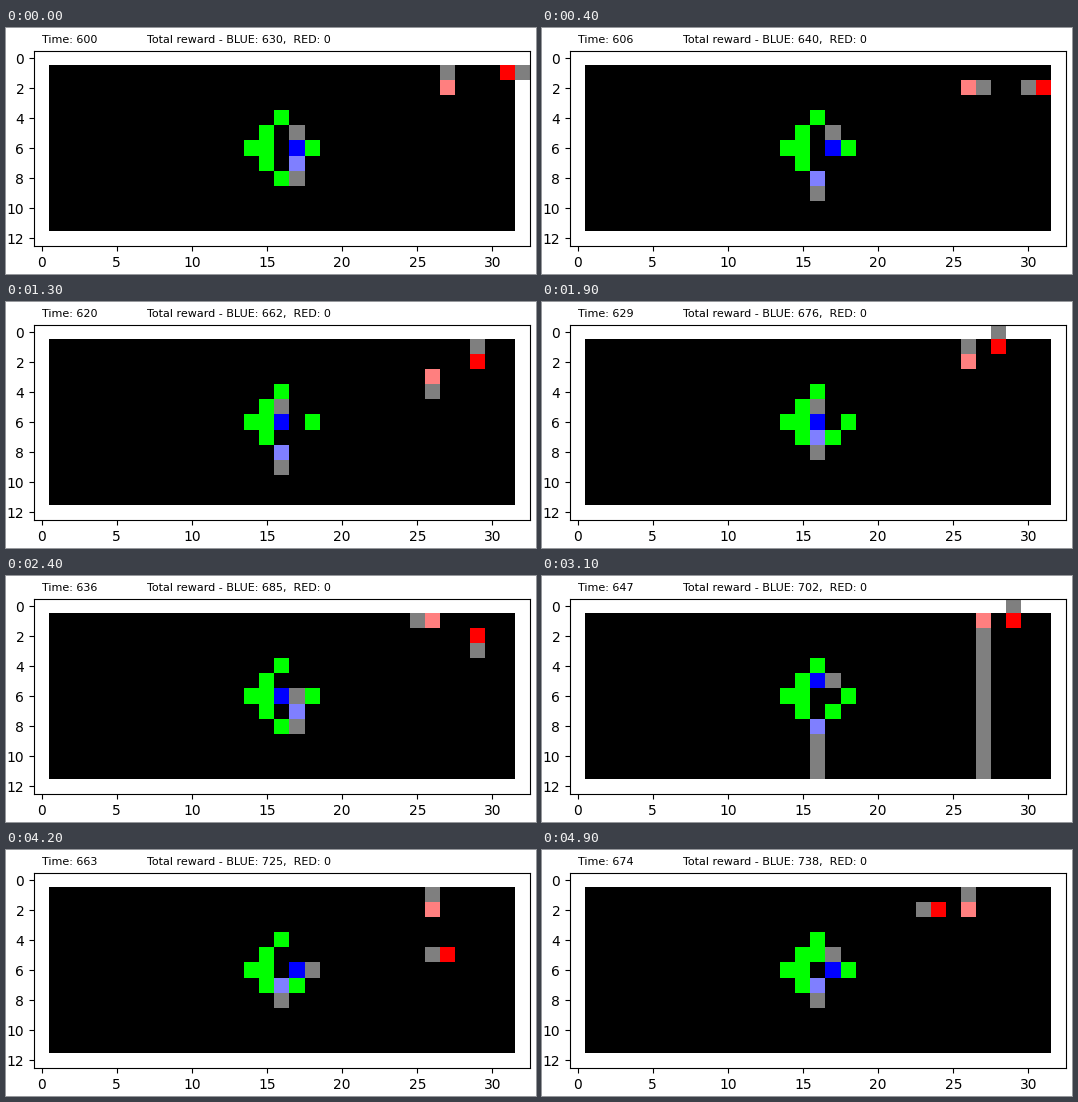
A matplotlib script for the animation above (5000 ms loop, 530 by 246 pixels).

```python
import matplotlib.pyplot as plt
import numpy as np
from matplotlib.animation import FuncAnimation

plt.rcParams["font.family"] = "DejaVu Sans"

W, H, DPI = 530, 246, 100
COLS, ROWS = 33, 13
FRAMES, STEPS, START = 50, 74, 600
AXES_LEFT, AXES_TOP, AXES_WIDTH = 28, 22.6, 496
AXES_HEIGHT = AXES_WIDTH * ROWS / COLS

GRAY, GREEN = (0.5, 0.5, 0.5), (0, 1, 0)
HEADINGS = {"U": (0, -1), "R": (1, 0), "D": (0, 1), "L": (-1, 0)}

# Each waypoint: step, column, row, heading.
RED_PATH = [
    (0, 31, 1, "R"), (3, 31, 2, "D"), (6, 31, 2, "L"), (9, 31, 1, "L"),
    (12, 29, 1, "L"), (15, 29, 2, "U"), (21, 29, 2, "R"), (25, 29, 1, "U"),
    (29, 28, 1, "U"), (32, 28, 2, "D"), (36, 29, 2, "D"), (40, 30, 2, "R"),
    (44, 30, 1, "U"), (47, 29, 1, "U"), (50, 28, 2, "D"), (54, 28, 4, "D"),
    (57, 29, 4, "R"), (60, 28, 5, "L"), (63, 27, 5, "L"), (67, 26, 3, "L"),
    (70, 25, 3, "L"), (74, 24, 2, "L"),
]
PINK_PATH = [
    (0, 27, 2, "U"), (4, 27, 2, "R"), (7, 26, 2, "D"), (12, 25, 2, "D"),
    (16, 25, 3, "R"), (20, 26, 3, "D"), (25, 26, 2, "U"), (29, 26, 2, "U"),
    (32, 26, 1, "L"), (36, 26, 1, "L"), (40, 27, 1, "D"), (47, 27, 1, "D"),
    (50, 27, 2, "D"), (55, 27, 1, "D"), (58, 26, 1, "U"), (63, 26, 2, "U"),
    (70, 26, 2, "L"), (74, 26, 2, "U"),
]
BLUE_PATH = [
    (0, 17, 6, "U"), (3, 16, 6, "U"), (5, 17, 6, "U"), (8, 17, 5, "U"),
    (10, 16, 6, "U"), (12, 17, 6, "U"), (15, 17, 5, "U"), (18, 16, 5, "U"),
    (21, 16, 6, "U"), (24, 17, 6, "U"), (27, 17, 5, "U"), (29, 16, 6, "U"),
    (33, 17, 6, "R"), (36, 16, 6, "R"), (39, 17, 6, "R"), (42, 17, 5, "R"),
    (45, 16, 5, "R"), (47, 16, 5, "R"), (50, 16, 6, "R"), (53, 17, 6, "R"),
    (56, 17, 5, "R"), (59, 16, 6, "R"), (63, 17, 6, "R"), (66, 16, 6, "R"),
    (69, 17, 6, "U"), (71, 16, 6, "U"), (74, 17, 6, "U"),
]
SKY_PATH = [
    (0, 17, 7, "D"), (3, 16, 7, "D"), (6, 16, 8, "D"), (9, 16, 7, "D"),
    (12, 17, 7, "D"), (16, 16, 7, "D"), (19, 16, 8, "D"), (22, 16, 7, "D"),
    (25, 17, 7, "D"), (29, 16, 7, "D"), (32, 17, 7, "D"), (36, 17, 7, "D"),
    (40, 16, 7, "D"), (43, 16, 8, "D"), (47, 16, 8, "D"), (51, 16, 7, "D"),
    (54, 17, 7, "D"), (57, 16, 8, "D"), (60, 16, 7, "D"), (63, 16, 7, "D"),
    (67, 17, 7, "D"), (69, 16, 8, "D"), (72, 17, 7, "D"), (74, 16, 7, "D"),
]

# Colour, path, steps at which the beam is fired.
AGENTS = [
    ((1, 0, 0), RED_PATH, {12, 68}),
    ((1, 0.5, 0.5), PINK_PATH, {33, 47, 57}),
    ((0, 0, 1), BLUE_PATH, set()),
    ((0.5, 0.5, 1), SKY_PATH, {47}),
]

FOOD = [(16, 4), (15, 5), (14, 6), (15, 6), (15, 7), (18, 6)]
# Food that grows back for a while: column, row, first step, last step.
REGROWN = [
    (16, 8, 0, 5), (17, 7, 27, 31), (16, 8, 34, 39), (17, 7, 45, 52),
    (17, 7, 61, 66), (16, 5, 72, 74),
]
REWARD_STEPS = [0, 12, 29, 36, 47, 63, 74]
REWARDS = [630, 649, 676, 685, 702, 725, 738]


def pose(path, step):
    times, xs, ys, headings = zip(*path)
    x, y = (int(np.rint(np.interp(step, times, v))) for v in (xs, ys))
    return x, y, headings[np.searchsorted(times, step, side="right") - 1]


def paint_beam(grid, x, y, heading, fired):
    dx, dy = HEADINGS[heading]
    x, y = x + dx, y + dy
    grid[y, x] = GRAY
    while fired and 0 < x < COLS - 1 and 0 < y < ROWS - 1:
        grid[y, x] = GRAY
        x, y = x + dx, y + dy


def field(step):
    grid = np.ones((ROWS, COLS, 3))
    grid[1:-1, 1:-1] = 0
    for x, y in FOOD:
        grid[y, x] = GREEN
    for x, y, first, last in REGROWN:
        if first <= step <= last:
            grid[y, x] = GREEN
    poses = [pose(path, step) for _, path, _ in AGENTS]
    for (_, _, shots), place in zip(AGENTS, poses):
        paint_beam(grid, *place, step in shots)
    for (color, _, _), (x, y, _) in zip(AGENTS, poses):
        grid[y, x] = color
    return grid


fig = plt.figure(figsize=(W / DPI, H / DPI), dpi=DPI, facecolor="white")
ax = fig.add_axes([AXES_LEFT / W, 1 - (AXES_TOP + AXES_HEIGHT) / H,
                   AXES_WIDTH / W, AXES_HEIGHT / H])
image = ax.imshow(field(0), interpolation="nearest", aspect="auto")
ax.set_xticks(range(0, 31, 5))
ax.set_yticks(range(0, 13, 2))
time_label = ax.text(0, -1, "", fontsize=8)
reward_label = ax.text(7, -1, "", fontsize=8)


def update(frame):
    step = round(frame * STEPS / (FRAMES - 1))
    reward = round(np.interp(step, REWARD_STEPS, REWARDS))
    image.set_data(field(step))
    time_label.set_text(f"Time: {START + step}")
    reward_label.set_text(f"Total reward - BLUE: {reward},  RED: 0")
    return image, time_label, reward_label


animation = FuncAnimation(fig, update, frames=FRAMES, interval=100,
                          repeat=True, repeat_delay=0)
plt.show()
```
